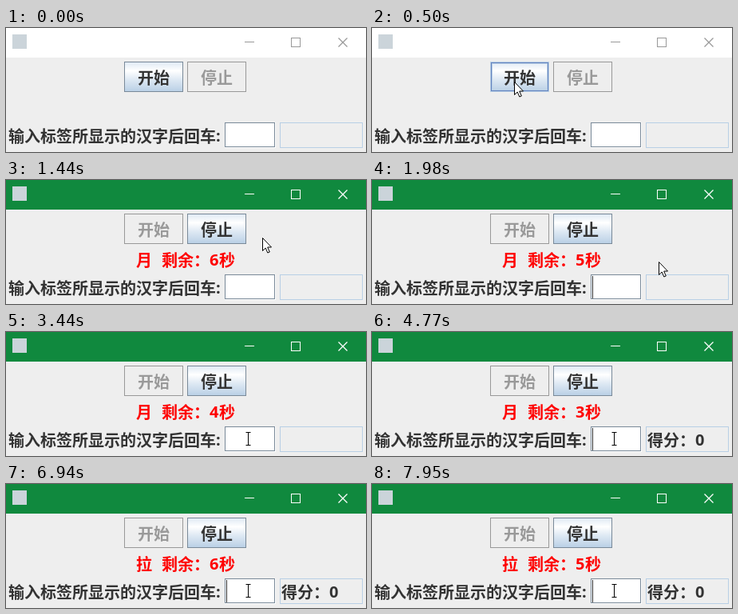
Animation, 451 px wide and 155 px high, one loop 8 s. Source, as an HTML page:

```html
<!DOCTYPE html>
<html lang="zh-CN">
<head>
<meta charset="utf-8">
<title>汉字输入练习</title>
<style>
  html, body { margin: 0; width: 100%; height: 100%; overflow: hidden; background: #eee; }
  svg { display: block; }
  text { font: bold 20px "Noto Sans", "Noto Sans CJK SC", sans-serif; white-space: pre; }
  rect { shape-rendering: crispEdges; }
</style>
</head>
<body>
<svg id="stage" width="451" height="155" viewBox="0 0 451 155"></svg>
<script>
const LOOP = 8000, PRESS = 820, START = 970, FIRST_ANSWER = 4770;
const TICK = 1006, TICKS_FROM = 890, ROUND = 6, BLINK = 500;
const stage = document.getElementById('stage');

// Pointer stops: time, x, y. It eases out into each one.
const stops = [
  [190, 242, 138], [500, 178, 67], [1190, 178, 67], [1750, 384, 74],
  [1830, 384, 74], [1980, 359, 102], [2290, 303, 133]
];
// Field contents after each keystroke; the first row is the field gaining focus.
const strokes = [[940, ''], [3900, '1'], [FIRST_ANSWER, ''], [7020, '月'], [7570, '']];

const fill = (x, y, w, h, color) =>
  `<rect x="${x}" y="${y}" width="${w}" height="${h}" fill="${color}"/>`;
const frame = (x, y, w, h, color) =>
  `<rect x="${x + .5}" y="${y + .5}" width="${w - 1}" height="${h - 1}" fill="none" stroke="${color}"/>`;

// Chinese glyphs sit one pixel lower than Latin ones on the same baseline.
const text = (x, y, s, color = '#333') =>
  `<text x="${x}" y="${y + (s > '~' ? 1 : 0)}" fill="${color}">${s}</text>`;

const gradient = `<defs><linearGradient id="metal" x2="0" y2="1">
  <stop stop-color="#dde8f3"/><stop offset=".3" stop-color="#fff"/>
  <stop offset=".6" stop-color="#dde8f3"/><stop offset="1" stop-color="#b8cfe5"/>
  </linearGradient></defs>`;

function pointerAt(t) {
  const next = stops.findIndex(stop => stop[0] > t);
  if (next === 0) return null;
  if (next < 0) return stops.at(-1).slice(1);
  const [t0, x0, y0] = stops[next - 1], [t1, x1, y1] = stops[next];
  const k = 1 - (1 - (t - t0) / (t1 - t0)) ** 2;
  return [x0 + (x1 - x0) * k, y0 + (y1 - y0) * k].map(Math.round);
}

function titleBar(active) {
  const ink = active ? '#fff' : '#999';
  return fill(0, 0, 451, 37, active ? '#10893e' : '#fff') +
    fill(8, 8, 18, 18, '#cbd4da') +
    fill(299, 17, 12, 1, ink) + frame(357, 12, 12, 12, ink) +
    `<path d="M416.5 12.5l11 11m0-11l-11 11" fill="none" stroke="${ink}" stroke-width="1.3"/>`;
}

function button(x, label, state, pointer) {
  const y = 42, w = 74, h = 38, edge = '#7a8a99', light = '#b8cfe5';
  const caption = text(x + 17, 69, label, state === 'off' ? '#999' : '#333');
  if (state === 'off') return frame(x, y, w, h, '#999') + caption;
  if (state === 'down') {
    return fill(x, y, w, h, light) + frame(x, y, w, h, edge) +
      fill(x, y, w, 2, edge) + fill(x, y, 2, h, edge) +
      frame(x + 16, 47, 42, 29, '#a3b8cc') + caption;
  }
  const over = pointer && pointer[0] >= x && pointer[0] < x + w &&
    pointer[1] >= y && pointer[1] < y + h;
  const rim = over
    ? frame(x, y, w, h, light) + frame(x + 1, y + 1, w - 2, h - 2, '#6382bf') +
      frame(x + 2, y + 2, w - 4, h - 4, light)
    : frame(x, y, w, h, edge);
  return fill(x, y, w, h, 'url(#metal)') + rim + caption;
}

function cursor([x, y]) {
  const overField = x >= 274 && x < 338 && y >= 118 && y < 150;
  const shape = overField
    ? 'M-2.5-7.5H3.5M.5-7.5V8.5M-2.5 8.5H3.5'
    : 'M.5.5V16.5L4.2 13 6.8 19 9.3 18 6.7 12H11.5Z';
  return `<path transform="translate(${x} ${y})" d="${shape}" fill="${overField ? 'none' : '#fff'}" stroke="#000"/>`;
}

function countdown(t) {
  const tick = Math.floor((t - TICKS_FROM) / TICK);
  return text(163, 107, '月拉'[Math.floor(tick / ROUND)], 'red') +
    text(195, 107, '剩余：', 'red') +
    text(255, 107, `${ROUND - tick % ROUND}`, 'red') +
    text(267, 107, '秒', 'red');
}

function entry(t) {
  const [since, word] = strokes.findLast(stroke => stroke[0] <= t);
  const caretX = 276 + word.length * (word > '~' ? 20 : 11);
  const caretOn = Math.floor((t - since) / BLINK) % 2 === 0;
  return text(276, 142, word) + (caretOn ? fill(caretX, 120, 1, 28, '#333') : '');
}

function scene(t) {
  const pointer = pointerAt(t), running = t >= START;
  const startState = running ? 'off' : t >= PRESS ? 'down' : 'on';

  let out = gradient + fill(0, 37, 451, 118, '#eee') + titleBar(t >= PRESS) +
    button(148, '开始', startState, pointer) +
    button(227, '停止', running ? 'on' : 'off', pointer) +
    text(3, 142, '输入标签所显示的汉字后回车') + text(263, 142, ':') +
    fill(274, 118, 64, 32, '#fff') + frame(274, 118, 63, 31, '#7a8a99') +
    frame(343, 118, 104, 32, '#b8cfe5');
  if (running) out += countdown(t) + entry(t);
  if (t >= FIRST_ANSWER) out += text(345, 142, '得分：') + text(405, 142, '0');
  if (pointer) out += cursor(pointer);
  return out;
}

let shown = '';
function draw() {
  const next = scene(performance.now() % LOOP);
  if (next !== shown) stage.innerHTML = shown = next;
  requestAnimationFrame(draw);
}
draw();
</script>
</body>
</html>
```
